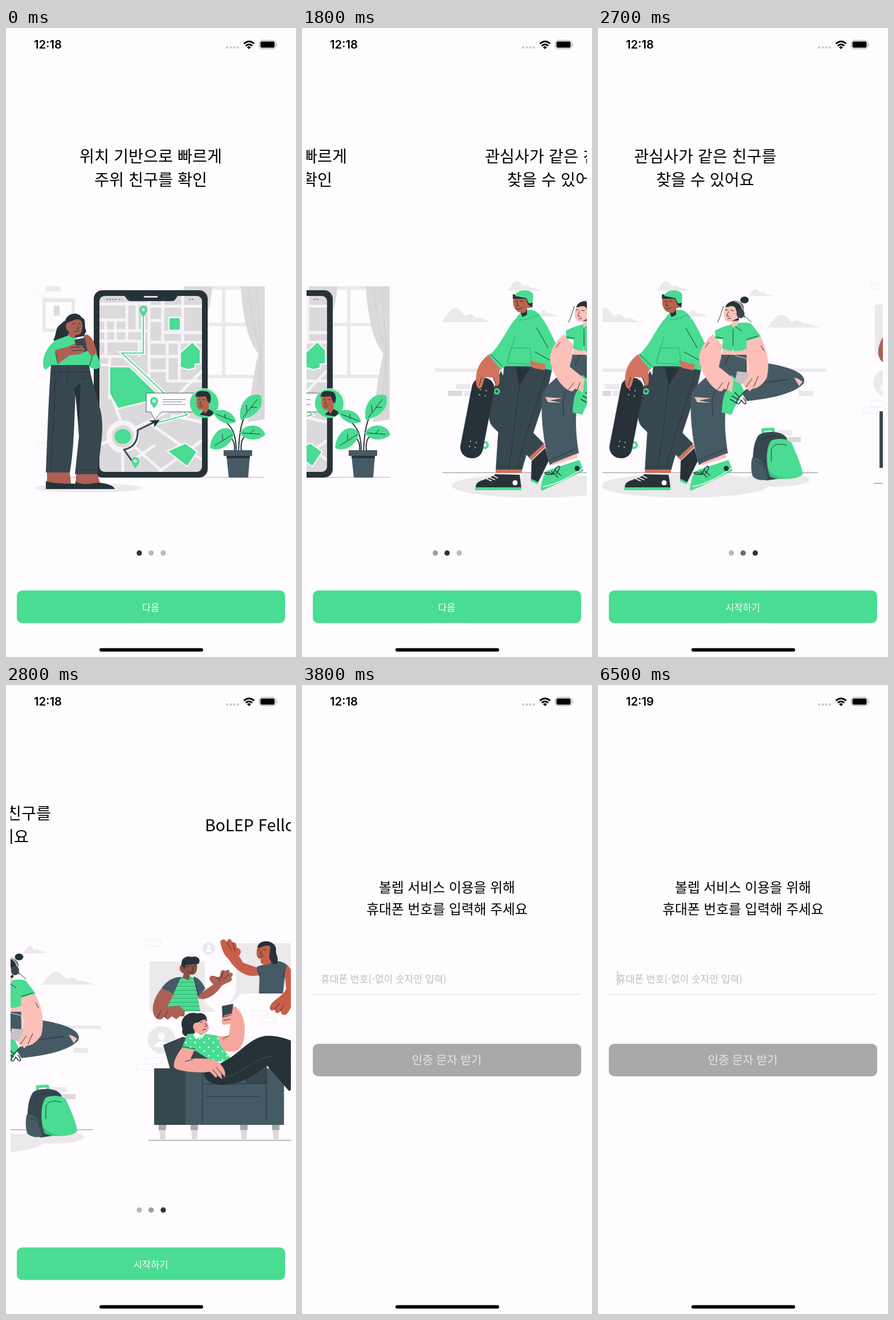
Write an HTML page that moves like this. It is 509x1101 px and loops after 6.6 s.

```html
<!DOCTYPE html>
<html lang="ko">
<head>
<meta charset="utf-8">
<title>Onboarding</title>
<style>
html, body { margin: 0; height: 100%; overflow: hidden; background: #fefcff; }
svg { display: block; width: 100vw; height: 100vh; }
text { font-family: 'Noto Sans CJK KR', 'Noto Sans CJK JP', 'Noto Sans', sans-serif; text-anchor: middle; }
.title { font-size: 28.3px; }
.small { font-size: 16.65px; }
.clock { font: 600 20.2px Inter, sans-serif; text-anchor: start; }
.g { fill: #49dc92; } .d { fill: #263238; } .m { fill: #37474f; } .s { fill: #455a64; }
.p { fill: #ebe9eb; } .q { fill: #dbd9db; } .w { fill: #fefcff; }
.l { fill: none; stroke: #263238; stroke-width: 1; stroke-linecap: round; stroke-linejoin: round; }
.gl { fill: none; stroke: #49dc92; stroke-width: 2; }
.b { fill: none; stroke: #efedf0; }
.a1 { fill: #ad6053; } .a2 { fill: #d2735f; } .a3 { fill: #fdc0b9; } .a4 { fill: #f6a79d; }
.a5 { fill: #c85e49; } .a6 { fill: #ee9784; } .a7 { fill: #8f5145; } .a8 { fill: #b9634c; }
</style>
</head>
<body>
<svg viewBox="0 0 509 1101">
<defs>
  <clipPath id="page"><rect x="8" width="492" height="1101"/></clipPath>
  <clipPath id="screen"><rect x="164" y="469" width="180" height="308" rx="9"/></clipPath>
  <clipPath id="shirt"><path id="raglan" d="M104 518L116 511C126 507 136 510 139 516L149 571H87L102 538Z"/></clipPath>
  <clipPath id="blouse"><path id="dotted" d="M126 611L150 609L180 614L184 630L204 656L172 660L140 640L117 635Z"/></clipPath>
  <pattern id="stripes" width="8" height="7" patternUnits="userSpaceOnUse"><rect y="2" width="8" height="1" fill="#36a870"/></pattern>
  <pattern id="spots" width="16" height="15" patternUnits="userSpaceOnUse"><circle cx="4" cy="4" r="1.4" fill="#fff"/><circle cx="12" cy="11" r="1.4" fill="#fff"/></pattern>
  <path id="cloud" d="M0 25C8 16 14 0 24 0C34 0 36 12 42 14C48 8 56 12 60 18C68 14 78 22 86 25Z"/>
  <path id="pin" d="M0 11C-4 5-7 2-7-2A7 7 0 0 1 7-2C7 2 4 5 0 11ZM0-5A3 3 0 0 0 0 1A3 3 0 0 0 0-5Z"/>
  <g id="user"><circle r="24"/><circle class="w" cy="-6" r="6.5"/><path class="w" d="M-12 13C-12-1 12-1 12 13Z"/></g>
  <path id="leaf" d="M0 0C-12-10-14-30 0-44C14-30 12-10 0 0Z"/>
</defs>

<g id="intro">
<g clip-path="url(#page)"><g id="track">

<g>
  <text class="title" x="254" y="234.5">위치 기반으로 빠르게</text>
  <text class="title" x="254" y="275.5">주위 친구를 확인</text>
  <path class="p" d="M70 452h26v9h-26ZM64 473h57v59h-57ZM70 480v46h45v-46Z" fill-rule="evenodd"/>
  <path class="q" d="M84 486h10v18h-10Z"/>
  <path class="b" d="M55 464h26v8h-26ZM80 503h20v12h-20ZM55 727h20v9h-20Z"/>
  <path d="M320 455H446V610H350M382 455V610M350 519H446" fill="none" stroke="#ebe9eb" stroke-width="6"/>
  <path class="q" d="M312 452H362C360 480 354 505 345 520L312 500ZM412 452H454V685L425 690C428 650 435 600 443 570C424 548 415 500 412 452Z"/>
  <path d="M426 454C430 500 438 540 447 564L440 684M440 454L448 564L449 684" fill="none" stroke="#cfcdd0"/>
  <path d="M112 786.5H454" stroke="#b9b7ba"/>
  <ellipse class="p" cx="144" cy="805" rx="95" ry="8"/>
  <rect class="d" x="154" y="459" width="200" height="328" rx="15"/>
  <g clip-path="url(#screen)">
    <path class="q" d="M164 469h180v308h-180Z"/>
    <path d="M164 483H252M164 511H212M164 530H250M175 511V572M192 511V548M212 483V548M230 483V532M251 469V620M164 548H234V575M250 487H344M275 469V550M310 469V548M252 512H276M276 533H344M252 550H344M283 550V620M250 575H305M304 548V620M252 600H284M284 618H344M164 575H206L290 655M182 575V650M164 590L182 590M290 655L344 600M184 640L202 690M228 700L344 640M164 730L182 722M205 738V777M222 730L275 777M252 692L344 756M290 678L344 690M268 777L344 722M222 757L262 730" fill="none" stroke="#f6f4f7" stroke-width="5"/>
    <path class="g" stroke="#f6f4f7" stroke-width="5" paint-order="stroke" d="M287 508h18v20h-18ZM307 569L327 551L340 564V587H331V594L320 597L307 593ZM183 594H216L262 638L246 641V653L197 665L183 640ZM285 741L315 728L334 742L318 766Z"/>
    <circle cx="205" cy="715" r="24" fill="#dbd9db" stroke="#f6f4f7" stroke-width="9"/>
    <ellipse class="g" cx="205" cy="715" rx="14.5" ry="13"/>
    <path class="gl" style="stroke:#fefcff;stroke-width:6" d="M241 504V569H203L318 677L265 691"/>
    <path class="gl" d="M241 504V569H203L318 677L265 691"/>
    <path class="l" style="stroke:#37474f;stroke-width:3" d="M222 759L207 738C222 735 232 725 231 704L260 690"/>
  </g>
  <path class="d" d="M205 468H304C297 470 300 478 290 478H220C210 478 213 470 205 468ZM251 687L270 686L260 699L260 692Z"/>
  <path d="M243 470.5h22" stroke="#fefcff" stroke-width="2.5" stroke-linecap="round"/>
  <path d="M176 475h20M198 475h6M321 475h8" stroke="#8d9295" stroke-width="2" stroke-dasharray="3 2"/>
  <use href="#pin" class="g" x="241" y="495"/><use href="#pin" class="g" x="227" y="760"/>
  <path d="M246 639H335V672H273L261 686L254 672H246Z" fill="#fefcff" stroke="#455a64"/>
  <path d="M348 631C390 632 378 682 349 682C314 682 315 632 348 631Z" fill="#fefcff" stroke="#d5d3d6"/>
  <circle class="g" cx="348" cy="657" r="25"/>
  <path class="d" d="M340 677L352 665L366 673L358 680Z"/>
  <path class="a8" d="M335 644H352L357 652L355 668L350 675L344 668C333 669 334 656 335 644Z"/>
  <path class="d" d="M333 647C331 635 344 634 350 636C360 636 361 648 358 657L354 654L351 645C345 644 338 648 335 644Z"/>
  <path class="l" d="M338 651l3-1M346 650l4 1M342 653l-2 5 3 1M339 662q4 3 7-1"/>
  <use href="#pin" class="g" x="260" y="655"/>
  <path d="M275 650.5H315M275 654.5H309M275 659H315" stroke="#77858b"/>
  <path class="l" style="stroke-width:2" d="M404 741C404 712 398 696 378 684M408 741C410 710 410 690 431 655M413 741C411 720 416 712 436 707M401 741C403 720 395 712 374 717"/>
  <path class="g" d="M363 672C381 663 399 672 404 689C389 697 372 690 363 672ZM412 686C406 662 423 636 447 643C455 664 437 681 412 686ZM410 709C422 688 451 694 455 712C442 724 421 723 410 709ZM400 710C389 689 360 704 358 735C374 744 397 729 400 710Z"/>
  <path class="l" d="M369 676L400 688M416 682L441 650M415 709L446 711M397 712L366 731M385 683l-1-7M423 672l-1-12M430 664l10 0M429 710l6-7M380 721l0-10"/>
  <path class="s" d="M382 739h50v10h-50ZM387 749H428L425 787H391Z"/><path class="d" d="M387 749h41v4h-41Z"/>

  <path class="d" d="M104 512C109 497 128 497 133 507C142 510 136 522 141 530L137 539L113 544C106 554 92 553 83 546C89 537 86 526 94 520C98 517 100 514 104 512Z"/>
  <path class="a1" d="M107 516C116 514 126 504 133 514C136 526 133 540 122 537L121 547L106 543L111 532C104 528 104 520 107 516Z"/>
  <path class="l" d="M117 518l5-1M127 517l4 1M125 521l3 5-4 1M119 530q5 3 9-1"/>
  <path class="g" d="M88 546L110 538C119 546 128 543 137 545C150 550 163 574 166 592C160 600 151 597 146 592L79 590L70 598C60 594 65 561 88 546Z"/>
  <path class="a1" d="M86 564L108 558L121 552L139 557L136 567L113 572L92 587ZM136 541C140 532 147 538 153 547L160 568L151 575L139 561Z"/>
  <path class="m" d="M120 546L138 542L143 565L127 571Z"/>
  <path class="a1" d="M108 559L132 555L139 563L131 571L110 573ZM140 545l8-4 4 12-10 4Z"/>
  <path class="l" d="M113 560L131 558M116 565L134 564M91 588L87 568M147 591L151 575"/>
  <path class="m" d="M79 590H146C148 610 158 638 166 670C174 704 164 742 160 781H121L128 715L122 636C120 690 119 740 112 778H70C73 700 75 640 79 590Z"/>
  <path class="d" d="M131 622L119 630L122 643L128 700Z"/>
  <path class="l" d="M79 602H147M108 590V625M86 605C86 650 82 720 78 772M95 604C92 616 87 619 81 620M133 605l4 10 8-3M127 774h30"/>
  <path class="a1" d="M72 778H112L114 797H72ZM123 781H160L166 799H122Z"/>
  <path class="d" d="M70 793C92 801 122 793 146 803V807H70ZM122 794C136 802 154 796 165 796C178 798 188 800 191 807H121Z"/>
</g>

<g transform="translate(492)">
  <text class="title" x="254" y="234.5">관심사가 같은 친구를</text>
  <text class="title" x="254" y="275.5">찾을 수 있어요</text>
  <g class="p">
    <use href="#cloud" transform="translate(53 490)"/><use href="#cloud" transform="translate(169 443) scale(.68)"/>
    <use href="#cloud" transform="translate(222 494) scale(.43)"/><use href="#cloud" transform="translate(330 457) scale(.5)"/>
    <use href="#cloud" transform="translate(362 502) scale(1.08 .9)"/>
    <path d="M41 596h426v6h-426ZM78 623h26v9h-26ZM92 635h25v9h-25ZM418 635h26v9h-26ZM380 704h27v9h-27Z"/>
    <ellipse cx="218" cy="801" rx="147" ry="21"/><ellipse cx="380" cy="791" rx="57" ry="12"/>
  </g>
  <path class="q" d="M64 635h25v9h-25ZM395 716h27v9h-27Z"/>
  <path d="M55 778.5H452" stroke="#8b8e91"/>
  <path class="m" d="M157 600C140 640 129 678 141 696C165 722 188 732 207 752L233 728C215 708 199 698 190 670Z"/>
  <path class="a2" d="M206 752l26-24 3 5-24 24Z"/>
  <path class="d" d="M211 758L235 735L241 758L222 796L210 791Z"/><path class="gl" d="M222 797l-12-6" style="stroke-width:4"/>
  <circle class="gl" cx="129" cy="730" r="5" style="stroke-width:4"/><circle class="gl" cx="150" cy="636" r="4" style="stroke-width:3"/>
  <g transform="rotate(11 116 682)">
    <rect class="d" x="96" y="611" width="40" height="143" rx="19"/>
    <path d="M111 633h12M111 642h12M111 725h12M111 734h12" stroke="#c9c7ca" stroke-width="2" stroke-dasharray="2 8"/>
  </g>
  <path class="a2" d="M137 571C119 583 111 602 114 624C117 634 122 633 125 625L129 611L143 612L149 627C157 625 155 614 154 602L160 590Z"/>
  <path class="l" d="M119 626l4-14M144 612l4 11"/>
  <path class="m" d="M163 590L247 594C241 640 219 686 194 775H148C152 710 156 650 163 590Z"/>
  <path class="d" d="M183 593L208 596L190 625Z"/>
  <path class="l" d="M190 624C183 680 176 740 171 771M238 597C225 650 199 710 186 770M150 768h44"/>
  <path class="g" d="M184 508C195 489 216 489 225 502C238 517 250 545 258 562L246 599L209 592H165L157 598L136 573C155 560 168 524 184 508Z"/>
  <path class="a2" d="M207 582L236 589L234 599L213 595Z"/>
  <path d="M168 586L175 560H208L212 589ZM190 511C204 512 216 504 224 502M168 586L182 540" fill="none" stroke="#2fae70"/>
  <path class="l" d="M139 571L160 592M217 567L246 583M220 525L240 560"/>
  <path class="d" d="M190 494L203 486L203 502L195 506Z"/>
  <path class="a8" d="M179 473H204L211 484C210 491 206 491 203 490C202 498 197 500 192 498C182 497 177 486 179 473Z"/>
  <path class="d" d="M178 474V466L203 469L213 481L212 490L205 484L201 474Z"/>
  <path class="g" d="M182 469C184 457 211 456 214 467L213 481L206 482L202 473Z"/>
  <path class="l" d="M182 479l4-1M191 478l5 1M187 480l-2 6 4 0M184 490q5 4 10-1"/>
  <path class="a2" d="M148 773h46v6h-46Z"/><path class="w" d="M148 779h45v7h-45Z"/>
  <path class="d" d="M113 804C113 789 134 793 147 781L190 782L193 804Z"/><path class="g" d="M112 804h81v5h-81Z"/>
  <circle class="w" cx="182" cy="796" r="4.5"/><path d="M136 786l11 5M132 789l9 4M143 783l9 5" stroke="#fefcff" stroke-width="1.5"/>

  <path class="s" d="M327 584C363 584 438 597 427 622C407 644 353 650 327 653L319 640L350 614Z"/>
  <path class="s" d="M282 570H333L335 602C315 610 295 630 292 655C286 685 290 720 294 744L243 765C232 728 226 676 230 642C237 616 285 600 282 570Z"/>
  <path class="l" d="M296 572l-8 18M327 573l4 16M293 614C270 625 262 650 268 680M290 736L242 757M401 615L350 622"/>
  <path class="a3" d="M235 646l30 2-22 4 21 4-24-1ZM410 612l9 15 6-8-8-5Z"/>
  <path class="g" d="M300 607L316 622L323 637C312 650 306 664 300 677L283 673C284 657 286 640 291 635Z"/>
  <path class="l" d="M301 644l12 7M298 650l12 7M306 638l8 8 12-13M314 646c-10 10-1 19 3 5 10 14 11 4 4-3" style="stroke-width:1.5"/>
  <path class="a3" d="M268 536C251 548 238 574 246 591C254 617 271 636 283 636L290 628L301 639L304 614L278 593L286 558ZM350 539C364 562 368 591 362 613C351 629 343 632 330 632C316 628 318 612 327 602L326 547ZM284 560H327L331 572H281Z"/>
  <path d="M310 601l20 2-4 22-20-6Z" fill="#c5c3c6"/>
  <path class="a3" d="M321 622l12-16 16 13-17 17ZM280 614l23 0-5 22-12-5Z"/>
  <path class="l" d="M276 633l9-12M291 635l5-15M325 629l11-15M347 610l-8 18M254 559l7-9M357 565l-5-9"/>
  <path class="g" d="M271 530C289 520 322 511 335 518L352 540L326 548L327 561C314 568 295 566 284 561L285 545L272 544Z"/>
  <path class="l" d="M303 527V562M273 541l12 2M327 545l20-6M307 523l11 7"/>
  <path d="M303 557c-2 18 8 18 18 20s10 13 7 24" fill="none" stroke="#fefcff"/>
  <path class="d" d="M289 493C288 474 321 472 322 491L316 505L306 500Z"/><ellipse class="d" cx="323" cy="476" rx="7.5" ry="6"/>
  <path class="a3" d="M289 489C297 488 303 484 307 490L311 502L313 510L311 520L302 524L301 514C288 516 284 507 289 489Z"/>
  <path class="d" d="M301 513L313 507V512Z"/>
  <path class="l" d="M289 494l4-1M299 494l5 1M295 496l-3 8 4 1M294 509l5-1M286 487c-3 9-5 18-10 28M322 503l13 12M317 482l6 25" stroke-width=".8"/>
  <path d="M306 478c8 1 13 8 14 15" fill="none" stroke="#aaa8ab" stroke-width="3"/><ellipse class="m" cx="316" cy="500" rx="7" ry="8"/>
  <path class="a3" d="M247 762L290 745L292 754L249 768Z"/><path class="w" d="M242 767l49-15 3 8-51 16Z"/>
  <path class="g" d="M227 808C230 789 232 780 240 774L295 756L302 775C278 787 252 800 229 810Z"/>
  <path d="M231 803C257 798 276 787 300 771" fill="none" stroke="#fefcff" stroke-width="1.5"/><circle class="d" cx="291" cy="771" r="4.5"/>
  <path class="l" d="M246 776l11 10M252 774l10 9M249 781c-20-9-19 3 0 0 4-18 20-19 5-1" style="stroke-width:1.5"/>

  <path d="M356 712l-1-9 18-1 2 9" fill="none" stroke="#49dc92" stroke-width="5" stroke-linejoin="round"/>
  <path class="m" d="M346 715C352 705 389 703 397 718L410 785L362 792L341 787C338 767 334 737 346 715Z"/>
  <path class="s" d="M337 751C352 752 359 760 364 790C354 793 342 791 337 784C334 773 334 760 337 751Z"/>
  <path class="g" d="M370 722C382 717 401 719 406 727C414 745 424 768 425 781C416 792 382 791 368 785C361 769 359 736 370 722Z"/>
  <path d="M362 765C366 781 382 787 396 788C384 791 374 788 368 785Z" fill="#3cc27e"/>
  <path class="l" d="M349 723c10-10 29-10 39-6M370 759V740c1-10 10-14 27-10M343 759c10 1 14 6 16 15"/>
</g>

<g transform="translate(984)">
  <text class="title" x="254" y="255.5">BoLEP Fellows</text>
  <path class="p" d="M60 484H157V556L178 572H60ZM212 452H312V540H222L200 560L212 536ZM330 516H428V603H310L330 588Z"/>
  <g class="p"><use href="#user" transform="translate(164 461) scale(.46)"/><use href="#user" transform="translate(404 490) scale(.77)"/><use href="#user" transform="translate(81 621)"/></g>
  <path class="b" d="M53 447h27v10h-27ZM427 447h27v10h-27ZM442 459h27v10h-27ZM240 570h27v9h-27ZM255 582h27v9h-27ZM52 653h27v10h-27ZM38 664h27v10h-27ZM442 664h27v10h-27Z"/>
  <path d="M58 797H449" stroke="#77797c"/>

  <use href="#raglan" class="g"/><path d="M80 505h75v68h-75Z" fill="url(#stripes)" clip-path="url(#shirt)"/>
  <path class="s" d="M116 511C96 511 86 524 81 531L102 541C106 532 111 519 116 511ZM137 510C148 513 153 522 158 531L145 547Z"/>
  <path class="a1" d="M81 531C69 545 62 565 68 578C72 587 81 588 85 581L92 586L99 580L107 585L113 580L121 580L122 571L112 561L91 564L102 541ZM152 538L172 524C164 517 162 508 172 509C177 510 181 514 184 508C184 499 189 497 192 501C198 497 202 499 200 504C207 502 208 508 203 512C207 514 203 520 197 521L187 526C176 543 158 554 145 548Z"/>
  <path class="l" d="M80 570l-6 12M92 570l-5 10M177 512l8 6M190 502l-5 12M199 507l-9 8M138 514l8 29"/>
  <path class="a7" d="M117 488L143 482C145 501 142 509 131 507L129 517L118 512L120 505C111 502 111 492 117 488Z"/>
  <path class="d" d="M117 491C113 478 126 473 134 476C145 473 151 481 146 488L124 490L121 498Z"/>
  <path class="l" d="M126 493l4-1M137 492l4 0M135 494l2 6-3 1M128 503q5 2 9-1"/>

  <path class="d" d="M249 461C250 444 279 445 282 461C281 475 286 483 286 488L266 489L254 478Z"/>
  <path class="a5" d="M249 460C258 461 265 452 272 458L270 477L274 486L263 492L255 486V480C247 478 247 470 249 460Z"/>
  <path class="l" d="M250 464l4-1M260 463l4 1M256 466l-2 5 4 1M252 475q4 2 8-1"/>
  <path class="s" d="M247 495C258 486 264 494 278 484C289 482 297 486 302 491L297 515L294 540H252L253 512Z"/>
  <path class="d" d="M272 456C280 464 288 476 284 488L276 489C275 478 272 468 272 456Z"/>
  <path class="a5" d="M184 449C190 442 193 446 196 450C198 441 203 444 206 451C211 449 213 454 213 460C221 461 222 468 217 474L224 486L247 494L252 508C230 514 211 499 199 480C190 473 186 460 184 449ZM297 503L302 490C312 502 321 519 317 537C312 551 308 572 299 577C293 579 290 574 290 570C285 578 279 573 280 568C272 574 268 565 274 558C281 549 294 544 300 532Z"/>
  <path class="l" d="M196 450l7 14M206 451l4 15M280 567l8-9M290 570l6-10M294 512l4-14M250 500l4 8"/>

  <path class="g" d="M329 604C335 578 347 553 371 547C382 548 382 555 391 557C404 555 406 551 412 547L437 538C438 559 437 575 425 578L389 573L387 588L361 604Z"/>
  <path class="a6" d="M411 550L410 534C402 529 399 521 405 521C401 512 406 508 411 513C411 504 418 502 420 507C426 502 429 507 427 512C433 510 435 516 433 524L432 540ZM362 589C380 593 398 598 405 609L399 616L388 613L390 623L382 621L377 626C366 617 360 608 359 597Z"/>
  <path class="l" d="M411 514l5 9M418 512l2 9M376 613l-6-8M388 613l-9-9M360 592l11-22M410 551l18-8M390 558l-12 16"/>
  <path class="a6" d="M349 528L369 524C376 529 374 536 370 537L372 549L362 555L357 546C348 546 347 536 349 528Z"/>
  <path class="d" d="M344 522C346 513 370 514 375 521C376 531 371 537 368 531L365 526L348 529Z"/>
  <path class="l" d="M355 541q4 2 7-1M356 534l-1 4 3 0"/><g fill="none" stroke="#6c8a7c"><circle cx="352" cy="535" r="3.5"/><circle cx="361" cy="534" r="4"/></g>

  <path class="m" d="M84 630L118 616L180 628L178 672H96ZM300 645L336 648L330 660L305 655Z"/>
  <path class="q" d="M76 770h13l-2 27h-8ZM132 770h13l-2 27h-8ZM219 770h13l-2 27h-8ZM275 770h13l-2 27h-8Z"/>
  <path d="M76 770h13v9h-13ZM132 770h13v9h-13ZM219 770h13v9h-13ZM275 770h13v9h-13Z" fill="#aaa8ab"/>
  <path class="s" d="M68 671H296V770H68Z"/><path class="m" d="M68 671h55v99h-55ZM228 660H266V698H228Z"/>
  <path class="l" d="M153 680V766M153 698H266M265 685V760M160 720H252"/>
  <path class="d" d="M118 603C110 582 130 570 143 575C156 571 164 582 159 591L144 600L139 615C125 619 114 612 118 603Z"/>
  <path class="a4" d="M141 591C148 592 150 584 159 586L164 598C164 609 156 612 150 608L151 616L138 618L139 604C134 600 137 592 141 591Z"/>
  <path class="l" d="M149 591l4-2M158 588l3-1M158 592l3 5-4 1M153 604l6-2"/>
  <path class="a4" d="M180 615L199 614L202 593L190 595C184 590 188 584 188 577L194 566L210 562C221 572 227 584 227 602C227 617 225 634 213 640C204 643 193 642 186 637Z"/>
  <path class="m" d="M187 562L207 558L204 578L188 582Z"/><path class="a4" d="M190 579l14-4-2 16-11 2Z"/>
  <path class="l" d="M190 581l12-3M190 587l12-2M189 619l10-5"/>
  <use href="#dotted" class="g"/><path d="M115 608h92v54h-92Z" fill="url(#spots)" clip-path="url(#blouse)"/>
  <path class="w" d="M137 612l6-4 8 5 5-3-3 8-6-1-6 3Z"/>
  <path class="a4" d="M336 648L365 664L391 661L365 679L326 660ZM337 682L357 706L377 720L318 726L321 706L306 708Z"/>
  <path class="d" d="M155 680L190 659C217 647 238 614 268 614C295 613 325 630 344 638L328 660L304 651C316 663 327 677 339 682L305 711L266 666C244 684 216 701 187 700C168 699 158 693 155 680Z"/>
  <path d="M187 688C223 682 247 650 275 650M330 684L304 706" fill="none" stroke="#455a64"/>
  <path class="a4" d="M117 635L139 639L132 654C151 654 171 652 182 661C190 669 195 678 192 686L186 679L187 690L179 683L177 688L166 677C144 680 107 676 103 669C101 659 109 645 117 635Z"/>
  <path class="l" d="M118 633l22 4M136 655l-13 4M179 683l-8-10M187 681l-10-12"/>

  <g class="g">
    <path d="M397 736C383 695 410 657 455 655L447 665L451 671L440 679L444 686C430 702 405 704 397 736ZM400 738C397 720 379 718 365 710L370 702L359 696L360 676C386 681 403 707 400 738Z"/>
    <use href="#leaf" transform="translate(408 736) rotate(58) scale(1 1.28)"/><use href="#leaf" transform="translate(396 741) rotate(-51) scale(.75 .9)"/>
  </g>
  <path class="l" d="M399 744C397 710 416 683 444 662M399 744C396 718 384 697 365 682M401 744C408 727 430 720 447 709M398 744L374 721M414 693l0-14M426 678l13 0"/>
  <path class="d" d="M361 681C377 676 382 658 401 659L404 667L362 684ZM317 719C339 727 365 711 383 724L387 732L317 728Z"/>
  <path class="m" d="M378 744h42v11h-42ZM382 755H417L414 797H385Z"/><path class="d" d="M382 755h35v5h-35Z"/>
</g>

</g></g>
<circle id="dot0" cx="234" cy="919" r="4.7"/><circle id="dot1" cx="254.7" cy="919" r="4.7"/><circle id="dot2" cx="276" cy="919" r="4.7"/>
<rect class="g" x="19" y="984.5" width="471" height="57" rx="9.5"/>
<text id="next" class="small w" x="254" y="1020.5">다음</text>
<text id="start" class="small w" x="254" y="1020.5">시작하기</text>
</g>

<g id="login">
  <g style="font-size:23.8px"><text x="254.5" y="363">볼렙 서비스 이용을 위해</text><text x="254.5" y="400.5">휴대폰 번호를 입력해 주세요</text></g>
  <text x="33" y="521" fill="#bfbdc0" style="font-size:17.1px;text-anchor:start">휴대폰 번호(-없이 숫자만 입력)</text>
  <path d="M19 541.5H490" stroke="#dddbde"/>
  <rect id="caret" x="33.3" y="501" width="2.4" height="25.5" rx="1.2" fill="#a3b5ad"/>
  <rect x="19" y="628" width="471" height="57" rx="9.5" fill="#aaa8ab"/>
  <text x="254" y="663.5" fill="#e6e4e7" style="font-size:20.2px">인증 문자 받기</text>
</g>

<text id="early" class="clock" x="49" y="36.3">12:18</text><text id="late" class="clock" x="49" y="36.3">12:19</text>
<path d="M388 34H408" stroke="#cac8cb" stroke-width="4.2" stroke-linecap="round" stroke-dasharray="0 6.4"/>
<path d="M417.5 27.5Q426.5 19.5 435.5 27.5M420.8 31.2Q426.5 26.2 432.2 31.2" fill="none" stroke="#000" stroke-width="3"/>
<path d="M426.5 37L423 33.5Q426.5 30.5 430 33.5Z"/>
<rect x="444.5" y="21.5" width="29" height="15" rx="4.5" fill="none" stroke="#a5a3a6"/><rect x="446.5" y="23.5" width="25" height="11" rx="2.8"/>
<path d="M475 26.5q2.5 2.5 0 5Z" fill="#a5a3a6"/>
<rect x="164" y="1085.5" width="182" height="6" rx="3"/>
</svg>
<script>
const LOOP = 6600, PAGE = 492;
const ON = '#333235', OFF = '#bab8bb', FADE = ['#6b696c', '#a09ea2', OFF];

// Each step is [time in ms, value] and holds until the next one.
function play(id, prop, ...steps) {
  const frames = [...steps, [LOOP, steps.at(-1)[1]]]
    .map(([t, v]) => ({ offset: t / LOOP, [prop]: v, easing: 'step-end' }));
  document.getElementById(id).animate(frames, { duration: LOOP, iterations: Infinity });
}
const hideAt = (id, t) => play(id, 'opacity', [0, 1], [t, 0]);
const showAt = (id, t) => play(id, 'opacity', [0, 0], [t, 1]);
const ticks = (t0, values) => values.map((v, i) => [t0 + i * 100, v]);
const slide = (t0, from) => ticks(t0, [.134, .61, .97, 1].map(p => `translateX(${-PAGE * (from + p)}px)`));

play('track', 'transform', [0, 'translateX(0px)'], ...slide(1700, 0), ...slide(2700, 1));
play('dot0', 'fill', [0, ON], ...ticks(1700, FADE));
play('dot1', 'fill', [0, OFF], [1700, ON], ...ticks(2700, FADE));
play('dot2', 'fill', [0, OFF], [2700, ON]);
hideAt('next', 2700);
showAt('start', 2700);
hideAt('intro', 3800);
showAt('login', 3800);
hideAt('early', 4500);
showAt('late', 4500);
play('caret', 'opacity', [0, 0], [5600, 1], [6200, .5], [6300, 0], [6500, .6]);
</script>
</body>
</html>
```
